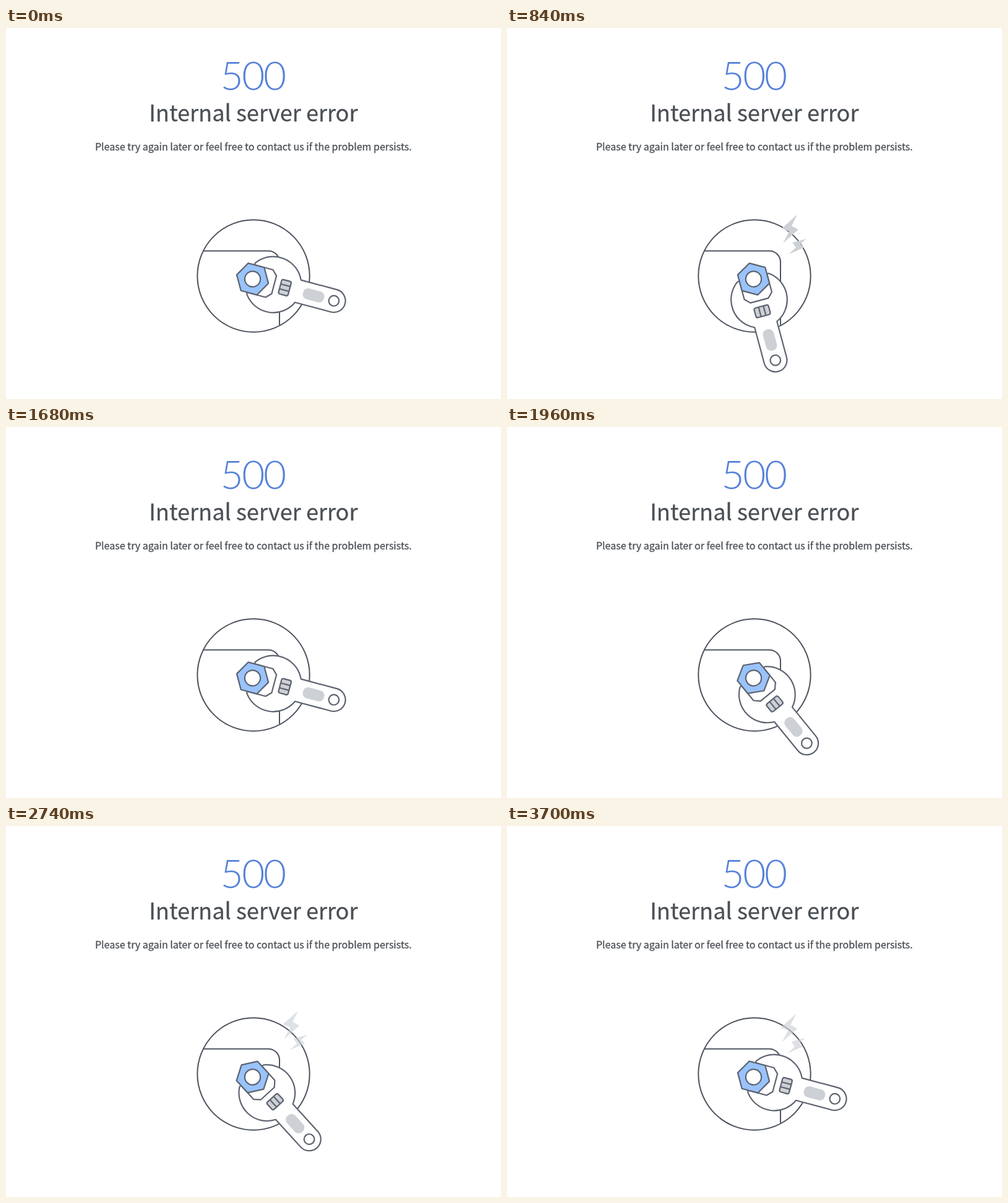
An HTML page for the animation above (3.72 s loop, 800x600 px).

```html
<!DOCTYPE html>
<html lang="en">
<head>
<meta charset="utf-8">
<title>Internal server error</title>
<style>
  html, body { margin: 0; width: 100%; height: 100%; overflow: hidden; background: #fff; }
  svg { display: block; width: 800px; height: 600px; }
  text { text-anchor: middle; fill: #4b5056; font-family: "Noto Sans CJK JP", "Noto Sans CJK SC", "Noto Sans", sans-serif; }
  .copy { stroke: #4b5056; stroke-width: 0.3; }
  .code { font: 300 64px Lato, sans-serif; letter-spacing: -2.4px; fill: #5581da; }
  .frame { fill: none; stroke: #4c525e; stroke-width: 2; }
  .tool { fill: #fff; stroke: #5d6370; stroke-width: 2.2; stroke-linejoin: round; }
  .tool .grip { fill: #cdd1d5; }
  .tool .slot { fill: #cdd1d5; stroke: none; }
  .tool .nut { fill: #99c3fb; }
  #bolts { fill: #cdd1d6; }
</style>
</head>
<body>
<svg viewBox="0 0 800 600">
  <text class="code" x="398.7" y="99.5">500</text>
  <text class="copy" x="399.9" y="150.5" font-size="36.2">Internal server error</text>
  <text class="copy" x="399.8" y="198" font-size="16">Please try again later or feel free to contact us if the problem persists.</text>

  <g class="frame">
    <circle cx="400" cy="401" r="90.7"/>
    <path d="M319 360.5H424A18 18 0 0 1 442 378.5V480.5"/>
  </g>

  <g id="bolts">
    <path d="M469 302 444 324 456 329 446 348 471 326 460 320Z"/>
    <path d="M484 341 461 347 467 355 455 366 480 355 474 349Z"/>
  </g>

  <g id="wrench" class="tool">
    <path d="M-1 -23Q-4 -24 -1.9 -27A45.5 45.5 0 0 1 76 -18.7H136A18.7 18.7 0 0 1 136 18.7H76A45.5 45.5 0 0 1 -1.9 27Q-4 24 -1 23H28L36 15V-15L28 -23Z"/>
    <circle cx="136" r="8.3"/>
    <rect class="slot" x="84.5" y="-9" width="35" height="18" rx="8"/>
    <rect class="grip" x="46" y="-12" width="16" height="24" rx="3"/>
    <path d="M46 -4H62M46 4H62"/>
    <path class="nut" d="M26.5 0 13.3 23H-13.3L-26.5 0 -13.3 -23H13.3Z"/>
    <circle r="12.6"/>
  </g>
</svg>
<script>
const LOOP = 3720;
const wrench = document.getElementById("wrench");
const bolts = document.getElementById("bolts");

const clamp = x => Math.min(1, Math.max(0, x));
const linear = p => p;
const easeIn = p => 1 - Math.cos(p * Math.PI / 2);
const easeInOut = p => (1 - Math.cos(p * Math.PI)) / 2;

// start, end, angle from, angle to, easing
const swings = [
  [70, 830, 15, 75, easeInOut],
  [830, 1515, 75, 15, easeInOut],
  [1680, 2180, 15, 75, easeInOut],
  [2180, 2740, 75, 47.7, easeIn],
  [2740, 3700, 47.7, 15, linear]
];

// start and length of each flash
const flashes = [[620, 620], [2140, 760], [3620, 620]];

function wrenchAngle(t) {
  let angle = 15;
  for (const [start, end, from, to, ease] of swings)
    if (t >= start) angle = from + (to - from) * ease(clamp((t - start) / (end - start)));
  return angle;
}

function drawBolts(t) {
  const flash = flashes.find(([start, length]) => t >= start && t < start + length);
  if (!flash) return bolts.setAttribute("opacity", 0);
  const p = (t - flash[0]) / flash[1];
  const shift = 7.5 * (p - 0.355);
  bolts.setAttribute("opacity", clamp(Math.min(p * 5, (1 - p) * 3)));
  bolts.setAttribute("transform", `translate(${shift} ${-shift})`);
}

const begin = performance.now();
function draw(now) {
  const t = Math.max(0, now - begin) % LOOP;
  wrench.setAttribute("transform", `translate(398.5 406) rotate(${wrenchAngle(t)})`);
  drawBolts(t);
  requestAnimationFrame(draw);
}
draw(begin);
</script>
</body>
</html>
```
